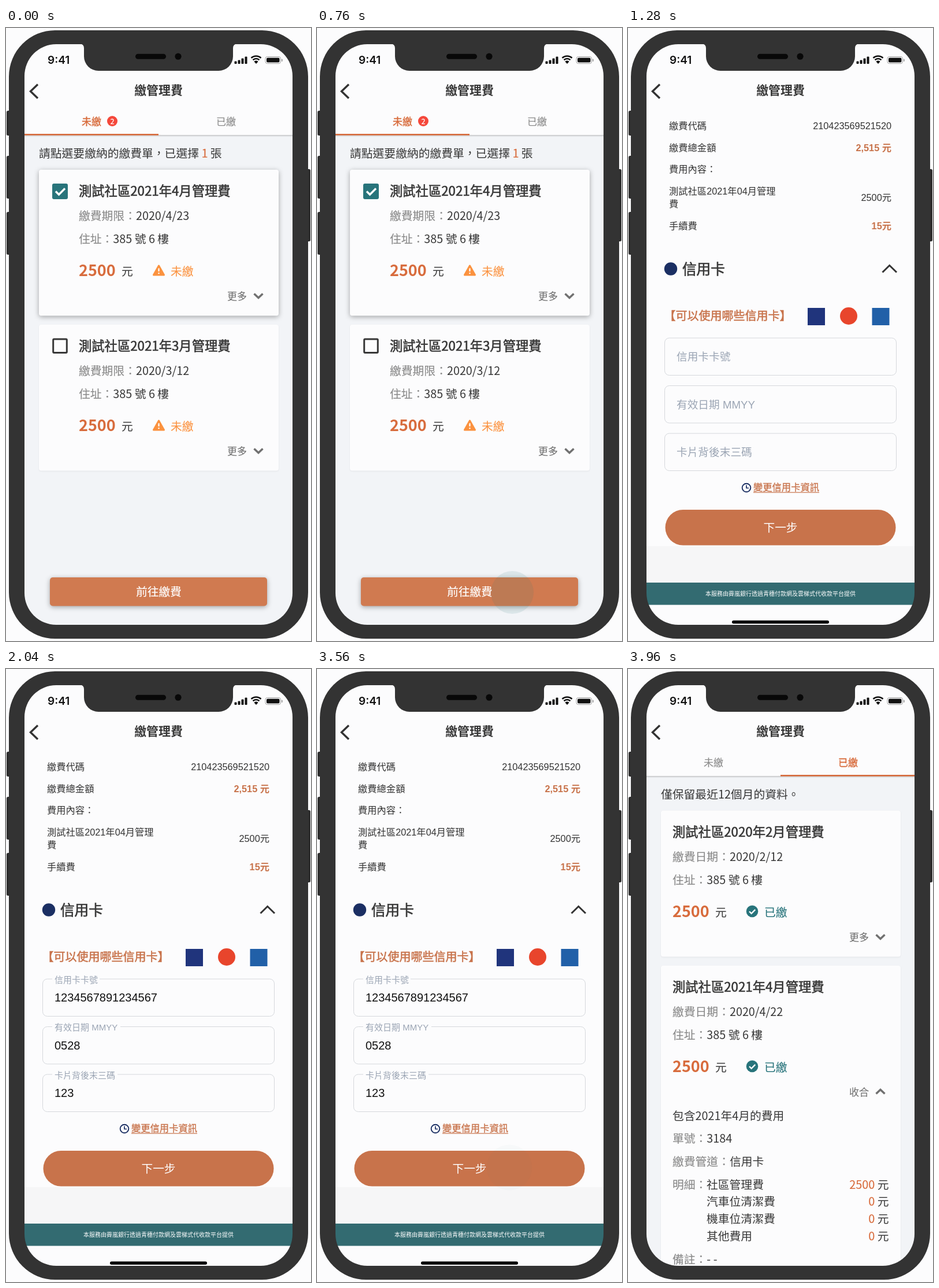
Recreate the animation shown at these times as an HTML page. Size 528 by 1060 pixels, loop 6 s.

```html
<!DOCTYPE html>
<html lang="zh-Hant">
<head>
<meta charset="utf-8">
<title>繳管理費</title>
<style>
html, body { margin: 0; width: 100%; height: 100%; overflow: hidden; background: #fcfcfd; }
svg { display: block; width: 528px; height: 1060px; }
text { font-family: 'Noto Sans CJK TC', 'Noto Sans CJK', 'Noto Sans TC', sans-serif; white-space: pre; }
.form text { font-family: 'Liberation Sans', 'Noto Sans CJK TC', 'Noto Sans CJK', sans-serif; }
.form text.head { font-family: 'Noto Sans CJK TC', 'Noto Sans CJK', sans-serif; }
text.clock, .form text.clock { font-family: Inter, sans-serif; }
.raised { filter: drop-shadow(0 2px 4px #0005); }
.flat { filter: drop-shadow(0 1px 1px #0001); }
</style>
</head>
<body>
<svg id="stage" viewBox="0 0 528 1060" xmlns="http://www.w3.org/2000/svg"></svg>
<script>
const INK = '#373737', GREY = '#8b8b8b', ORANGE = '#d86c3d', AMBER = '#fb923f',
      TEAL = '#28747b', RUST = '#c8734b', NAVY = '#1b2f63', HINT = '#9ba5b4', PAPER = '#fcfcfd';
const LOOP = 6000, STEP = 40, WIDTH = 464;

// Text is placed by its vertical centre; "weight" below 100 is a thickening stroke width.
function text(x, cy, content, { size = 19.8, fill = INK, weight = 0, anchor = 'start', cls = '', rise = 0.38 } = {}) {
  const heavy = weight >= 100 ? `font-weight="${weight}"`
    : weight ? `stroke="${fill}" stroke-width="${weight}"` : '';
  return `<text x="${x}" y="${cy + size * rise}" font-size="${size}" fill="${fill}" text-anchor="${anchor}" class="${cls}" ${heavy}>${content}</text>`;
}
const span = (content, fill, width = 0.15) =>
  `<tspan fill="${fill}" stroke="${fill}" stroke-width="${width}">${content}</tspan>`;
const rect = (x, y, w, h, r, fill, extra = '') =>
  `<rect x="${x}" y="${y}" width="${w}" height="${h}" rx="${r}" fill="${fill}" ${extra}/>`;
const circle = (x, y, r, fill, extra = '') =>
  `<circle cx="${x}" cy="${y}" r="${r}" fill="${fill}" ${extra}/>`;
const line = (d, color, width, extra = '') =>
  `<path d="${d}" fill="none" stroke="${color}" stroke-width="${width}" ${extra}/>`;
const chevron = (x, y, dir) =>
  line(`M${x - 7.5} ${y - 3.5 * dir}l7.5 ${7 * dir}l7.5 ${-7 * dir}`, '#707070', 3.5);
const field = (x, cy, label, value) =>
  text(x, cy, span(label, GREY) + value);

function statusBar() {
  const bars = [4.5, 6.5, 9.5, 12.5].map((h, i) => rect(395.5 + i * 6, 62 - h, 4, h, 1, '#111')).join('');
  const wifi = [[12.5, 8.5], [8, 5.5]].map(([r, half]) =>
    line(`M${433 - half} ${61 - Math.sqrt(r * r - half * half)}A${r} ${r} 0 0 1 ${433 + half} ${61 - Math.sqrt(r * r - half * half)}`, '#111', 2.6)).join('');
  return text(72, 55.5, '9:41', { size: 19, fill: '#111', weight: 600, cls: 'clock', rise: 0.36 }) + bars + wifi +
    '<path d="M433 62l-3.6-4a5.2 5.2 0 0 1 7.2 0z" fill="#111"/>' +
    rect(449, 49.5, 26.5, 12, 3.5, 'none', 'stroke="#a0a0a0"') +
    rect(451, 51.5, 22.5, 8, 2, '#111') + rect(477, 53.5, 1.7, 4.5, 0.8, '#a0a0a0');
}

const header = () => statusBar() + line('M55 97.5L42.5 109.5L55 121.5', '#333', 3.4) +
  text(264, 107, '繳管理費', { size: 20.9, weight: 700, anchor: 'middle', cls: 'head' });

function listScreen(active, content) {
  const tab = (i, x, label) => text(x, 162, label,
    { size: 17, fill: active === i ? ORANGE : GREY, weight: active === i ? 0.4 : 0.15 });
  return rect(32, 28, WIDTH, 1004, 0, '#f2f4f7') +
    rect(32, 28, WIDTH, 157, 0, PAPER) + rect(32, 185, WIDTH, 1.5, 0, '#c4c4c6') +
    rect(32, 186.5, WIDTH, 1.5, 0, '#e2e4e6') +
    header() + tab(0, 131, '未繳') + tab(1, 364, '已繳') +
    rect(32 + active * 232, 183, 232, 2.6, 0, ORANGE) + content;
}

function bill(x, y, title, dateLabel, date) {
  return text(x, y + 282, title, { size: 22.3, weight: 0.6 }) +
    field(x, y + 324, dateLabel, date) + field(x, y + 364, '住址：', '385 號 6 樓') +
    text(x, y + 419.5, '2500', { size: 27, fill: ORANGE, weight: 700, rise: 0.366 }) +
    text(x + 74, y + 420, '元');
}
const toggle = (cy, label, dir) =>
  text(383, cy, label, { size: 17, fill: '#727272', weight: 0.1 }) + chevron(437, cy - 1, dir);

function unpaidBill(y, month, date, checked) {
  const box = checked
    ? rect(80, y + 269, 27, 27, 3, TEAL) + line(`M86 ${y + 282.5}l5.5 5.5l10.5 -10.5`, '#fff', 3.4)
    : rect(81.7, y + 538 - 268, 23.6, 23.6, 1.5, PAPER, `stroke="${INK}" stroke-width="3"`);
  return rect(57, y + 245, 415, 252.5, 4, PAPER, `class="${checked ? 'raised' : 'flat'}"`) + box +
    bill(126, y, `測試社區2021年${month}月管理費`, '繳費期限：', date) +
    `<path d="M264.5 ${y + 411}l9 16h-18z" fill="${AMBER}" stroke="${AMBER}" stroke-width="3" stroke-linejoin="round"/>` +
    line(`M264.5 ${y + 415.5}v5.5m0 2v2.3`, '#fff', 2.2) +
    text(285, y + 420, '未繳', { fill: AMBER, weight: 0.1 }) + toggle(y + 464, '更多', 1);
}

const paidBill = (y, title, date, height) =>
  rect(57, y + 245, 415, height, 4, PAPER, 'class="flat"') +
  bill(77, y, title, '繳費日期：', date) + circle(215, y + 419, 10.3, TEAL) +
  line(`M210 ${y + 419.3}l3.6 3.6l6.6 -6.8`, '#fff', 2.3) +
  text(236, y + 420, '已繳', { fill: TEAL, weight: 0.1 });

const unpaid = () => listScreen(0,
  circle(184, 161, 9, '#f5483b') +
  text(184, 161, '2', { size: 12, fill: '#fff', weight: 0.3, anchor: 'middle' }) +
  text(57, 216, `請點選要繳納的繳費單，已選擇 ${span('1', ORANGE)} 張`) +
  unpaidBill(0, 4, '2020/4/23', true) + unpaidBill(268, 3, '2020/3/12', false) +
  rect(76, 950, 376, 49.5, 5, '#d07a50', 'class="raised"') +
  text(264.5, 975, '前往繳費', { size: 19.6, fill: '#fff', weight: 0.2, anchor: 'middle' }));

function paid() {
  const items = ['社區管理費', '汽車位清潔費', '機車位清潔費', '其他費用'].map((name, i) => {
    const cy = 891 + i * 29.8;
    return text(136, cy, name) +
      text(451.5, cy, `${span(i ? '0' : '2500', ORANGE)} 元`, { anchor: 'end' });
  }).join('');
  return listScreen(1, text(57, 216, '僅保留最近12個月的資料。') +
    paidBill(0, '測試社區2020年2月管理費', '2020/2/12', 252.5) + toggle(464, '更多', 1) +
    paidBill(268, '測試社區2021年4月管理費', '2020/4/22', 540) + toggle(732, '收合', -1) +
    text(77, 772, '包含2021年4月的費用') +
    field(77, 811, '單號：', '3184') + field(77, 851, '繳費管道：', '信用卡') +
    field(77, 891, '明細：', '') + items + field(77, 1020, '備註：', '- -'));
}

function payment() {
  const label = (cy, s) => text(71, cy, s, { size: 16.3, fill: '#333' });
  const value = (cy, s, strong) => text(456, cy, s,
    { size: 16.3, fill: strong ? RUST : '#333', weight: strong ? 700 : 0, anchor: 'end', rise: 0.36 });
  const inputs = [['信用卡卡號', '1234567891234567', 82], ['有效日期 MMYY', '0528', 118], ['卡片背後末三碼', '123', 113]];
  const each = draw => inputs.map((item, i) => draw(i * 82.5, ...item)).join('');
  return rect(32, 28, WIDTH, 1004, 0, PAPER) + rect(32, 896, WIDTH, 63, 0, '#f6f6f7') + header() +
    label(169, '繳費代碼') + value(169, '210423569521520') +
    label(207, '繳費總金額') + value(207, '2,515 元', true) + label(244, '費用內容：') +
    label(282, '測試社區2021年04月管理') + label(304, '費') + value(293, '2500元') +
    label(342, '手續費') + value(342, '15元', true) +
    circle(74, 416.5, 11.2, NAVY) + text(94, 416.5, '信用卡', { size: 24.6, weight: 0.7 }) +
    line('M440.5 422.5L452.7 410.5L465 422.5', '#333', 3) +
    text(62.5, 497.5, '【可以使用哪些信用卡】', { size: 20, fill: RUST, weight: 0.5 }) +
    rect(311, 484, 30, 30, 0, '#20347c') + circle(382, 498, 15, '#e8452c') + rect(422.5, 484, 30, 30, 0, '#2160a8') +
    each(y => rect(63.5, y + 536, 401, 64.5, 8, PAPER, 'stroke="#d5d8dc"')) +
    `<g id="empty">${each((y, name) => text(84, y + 568, name, { size: 18.7, fill: HINT }))}</g>` +
    `<g id="filled">${each((y, name, content, gap) => rect(80, y + 534, gap, 4, 0, PAPER) +
      text(84, y + 537, name, { size: 15, fill: HINT }) +
      text(84, y + 568, content, { size: 20, fill: '#111', rise: 0.35 }))}</g>` +
    circle(205, 795, 7.3, 'none', `stroke="${NAVY}" stroke-width="1.9"`) + line('M205 790.5v5h4', NAVY, 1.7) +
    text(217, 794, '變更信用卡資訊', { size: 16.3, fill: RUST, weight: 0.3 }) + rect(217, 802.5, 114, 1.2, 0, RUST) +
    rect(64.5, 833, 399, 61.5, 30.7, RUST) +
    text(264, 864, '下一步', { size: 19.7, fill: '#fff', anchor: 'middle' }) +
    rect(32, 959, WIDTH, 38.5, 0, '#336b71') +
    text(264, 978, '本服務由霽嵐銀行透過青穗付款網及雲梯式代收款平台提供', { size: 10, fill: '#fff', anchor: 'middle' }) +
    rect(180, 1024.5, 168, 5.5, 2.7, '#000');
}

function phone() {
  const button = (x, y, h) => rect(x, y, 8, h, 2.5, '#2e2e2e');
  return button(1, 143, 43) + button(1, 221, 74) + button(1, 318, 74) + button(519, 244, 125) +
    `<path fill-rule="evenodd" fill="#333" d="${roundBox(5, 4, 518, 1052, 80)}${roundBox(32, 28, 464, 1004, 55)}"/>` +
    '<path fill="#333" d="M128 27Q135 28 135 35V49A25 25 0 0 0 160 74H368A25 25 0 0 0 393 49V35Q393 28 400 27Z"/>' +
    rect(224, 44.7, 53, 9, 4.5, '#080808') + circle(298, 49.2, 5.6, '#080808');
}
function roundBox(x, y, w, h, r) {
  const arc = (dx, dy) => `a${r} ${r} 0 0 1 ${dx} ${dy}`;
  return `M${x + r} ${y}h${w - 2 * r}${arc(r, r)}v${h - 2 * r}${arc(-r, r)}h${2 * r - w}${arc(-r, -r)}v${2 * r - h}${arc(r, -r)}z`;
}

const $ = id => document.getElementById(id);
$('stage').innerHTML =
  `<clipPath id="screen">${rect(31, 27, 466, 1006, 55, '#000')}</clipPath>
   <g clip-path="url(#screen)">
     <g id="unpaid">${unpaid()}</g><g id="payment" class="form">${payment()}</g><g id="paid">${paid()}</g>
     <circle id="tap" fill="${TEAL}"/>
   </g>` + phone();

const taps = [{ start: 360, x: 338, y: 976 }, { start: 3040, x: 333, y: 862 }];
const slides = [
  { id: 'payment', start: 990, end: 1280, power: 1.28 },
  { id: 'paid', start: 3680, end: 3960, power: 1.69 }
];
const TAP_TIME = 600;
const easeOut = (p, power) => 1 - (1 - Math.min(1, Math.max(0, p))) ** power;
const show = (el, on) => el.setAttribute('visibility', on ? 'visible' : 'hidden');

function render(t) {
  for (const { id, start, end, power } of slides) {
    const x = WIDTH * (1 - easeOut((t - start) / (end - start), power));
    $(id).setAttribute('transform', `translate(${x} 0)`);
    $(id).style.display = t > start ? '' : 'none';
  }
  show($('empty'), t < 2040);
  show($('filled'), t >= 2040);

  const tap = taps.find(({ start }) => t >= start && t < start + TAP_TIME);
  show($('tap'), tap);
  if (tap) {
    const p = easeOut((t - tap.start) / TAP_TIME, 2);
    const attrs = { cx: tap.x, cy: tap.y, r: 13 + 27 * p, opacity: 1 - p };
    for (const name in attrs) $('tap').setAttribute(name, attrs[name]);
  }
}

const origin = performance.now();
function tick() {
  const t = (performance.now() - origin + 1) % LOOP;
  render(Math.floor(t / STEP) * STEP);
  requestAnimationFrame(tick);
}
tick();
</script>
</body>
</html>
```
